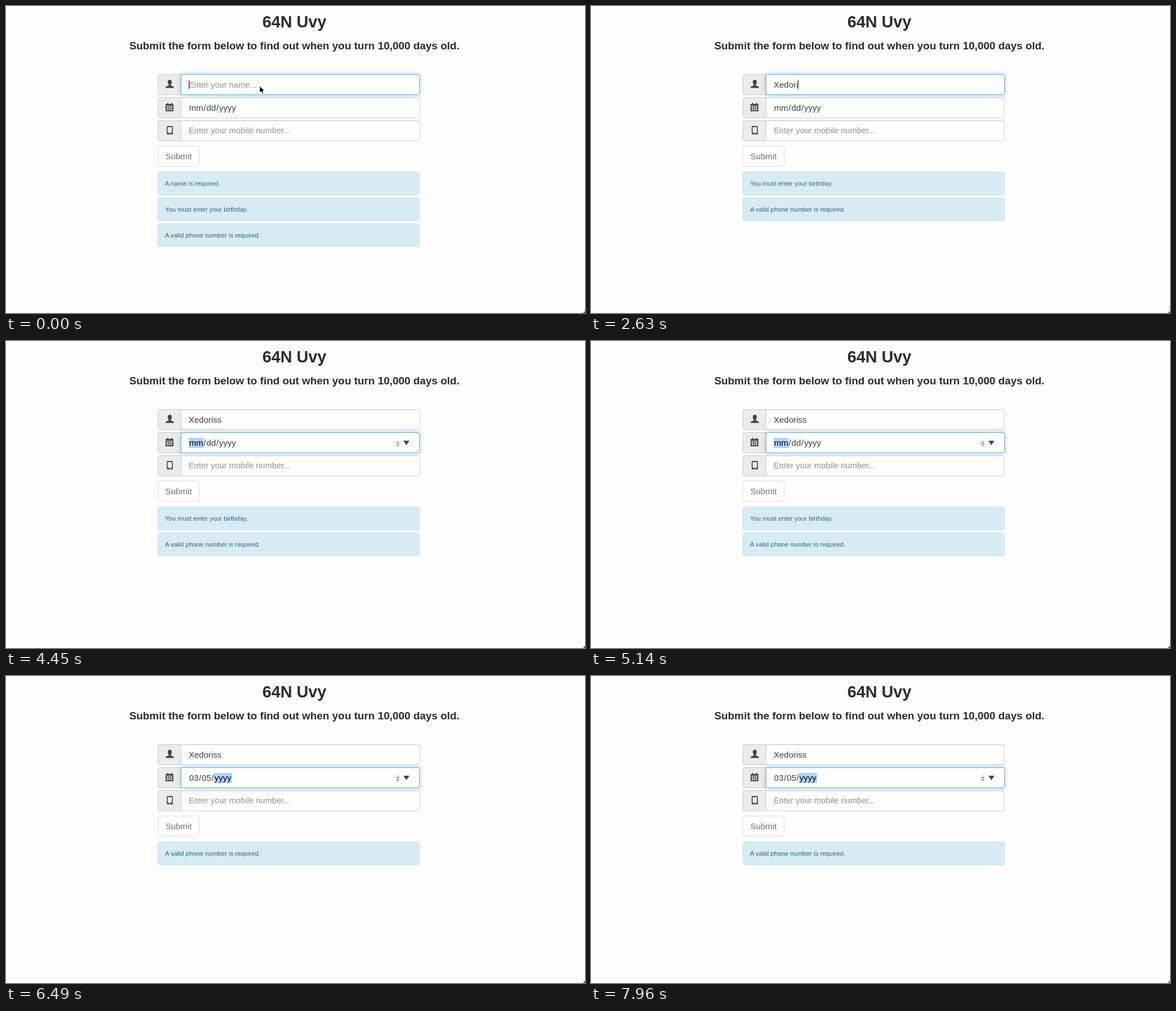
An HTML page that plays this animation: 1027 by 545 pixels, repeating every 8 s.

```html
<!DOCTYPE html>
<html lang="en">
<head>
<meta charset="utf-8">
<title>Day counter form</title>
<style>
* { box-sizing: border-box; }
html, body { margin: 0; width: 100%; height: 100%; overflow: hidden; background: #fdfdfc; }
body { position: relative; font: 15px "Liberation Sans", Arial, sans-serif; color: #404040; }
body > *, .row > * { position: absolute; }
h1, h2 { margin: 0; left: 0; width: 1023px; text-align: center; color: #2c2c2c; white-space: nowrap; }
h1 { top: 8px; font-size: 28.8px; line-height: 40px; }
h2 { top: 58px; font-size: 18.9px; line-height: 25px; }
.row { left: 269px; width: 465px; height: 37px; }
.addon { inset: 0 auto 0 0; width: 42px; background: #ebebeb; border: 1px solid #ccc; border-radius: 4px 0 0 4px; }
.addon svg { position: absolute; left: 13px; top: 9px; fill: #444; }
.field, .focus { inset: 0 0 0 41px; border: 1px solid #ccc; border-radius: 0 4px 4px 0; }
.field { background: #fdfdfc; padding-left: 13px; line-height: 35px; white-space: nowrap;
  box-shadow: inset 0 1px 1px rgba(0,0,0,.06); }
.focus { border-color: #66afe9; box-shadow: 0 0 8px rgba(102,175,233,.6); }
.hint { color: #919191; font-size: 14.7px; }
.caret { display: inline-block; width: 1px; height: 17px; margin-right: -1px; vertical-align: -3px; background: #333; }
.part { display: inline-block; padding: 0 .8px; line-height: 18px; }
.part.on { background: #b0d5fd; color: #000; }
#picker { left: 420px; top: 12px; }
button { left: 269px; top: 248px; width: 74px; height: 37px; padding: 0; font: inherit; color: #707070;
  background: #fefefe; border: 1px solid #dcdcdc; border-radius: 4px; }
.alert { left: 269px; width: 465px; height: 42px; padding-left: 12px; font-size: 11.35px; line-height: 41px;
  color: #2f6480; background: #d7ebf3; border: 1px solid #c5e6ef; border-radius: 4px; }
#mouse { left: 449px; top: 141px; }
#corner { right: 0; bottom: 0; width: 4px; height: 4px; background: radial-gradient(circle at 0 0, transparent 3px, #222 4px); }
</style>
</head>
<body>
<h1>64N Uvy</h1>
<h2>Submit the form below to find out when you turn 10,000 days old.</h2>

<div class="row" style="top:121px">
  <div class="addon"><svg width="16" height="16"><path d="M7.5 0C10.3 0 11.3 2 11 4.8 10.8 6.8 10 8 9.4 8.8V10L14 12Q15 12.6 15 14.5H0Q0 12.6 1 12L5.6 10V8.8C5 8 4.2 6.8 4 4.8 3.7 2 4.7 0 7.5 0Z"/></svg></div>
  <div class="field" id="name"></div><div class="focus"></div>
</div>
<div class="row" style="top:162px">
  <div class="addon"><svg width="16" height="16"><path d="M0 2H14V15H0ZM3 0H5V3H3ZM9.5 0H11.5V3H9.5Z"/><path d="M1 5.5H13M1 8.5H13M1 11.5H13M3.5 6V14M7 6V14M10.5 6V14" stroke="#ebebeb" stroke-width=".9"/></svg></div>
  <div class="field" id="date"></div><div class="focus"></div>
  <svg id="picker" width="30" height="16" fill="#444"><rect x="2.5" y="2.5" width="7" height="11" rx="3.5" fill="#fff" stroke="#ccc"/><path d="M4 7L6 4.5 8 7ZM4 9.5L6 12 8 9.5ZM16 3H26.5L21.2 11Z"/></svg>
</div>
<div class="row" style="top:203px">
  <div class="addon"><svg width="16" height="16"><path fill-rule="evenodd" d="M4 0H11Q13 0 13 2V13Q13 15 11 15H4Q2 15 2 13V2Q2 0 4 0ZM3.6 2V12H11.4V2ZM6.2 12.8V14H8.8V12.8Z"/></svg></div>
  <div class="field hint">Enter your mobile number...</div>
</div>

<button type="button">Submit</button>
<div class="alert">A name is required.</div>
<div class="alert">You must enter your birthday.</div>
<div class="alert">A valid phone number is required.</div>
<svg id="mouse" width="12" height="18"><path d="M1 1V13.2L3.8 10.6 5.8 15.2 7.8 14.3 5.9 9.9H9.6Z" fill="#000" stroke="#fff" stroke-width=".8"/></svg>
<div id="corner"></div>

<script>
const LOOP = 8000, BLINK = 520, FADE = 150;
const NAME = 'Xedoriss';
const KEYS = [1380, 1640, 1900, 2130, 2390, 2580, 2760, 2960];
const MOUSE_OFF = 1230, TAB = 3600, MONTH = 5300, DAY = 6300;

const get = id => document.getElementById(id);
const glows = document.querySelectorAll('.focus');
const alerts = document.querySelectorAll('.alert');
const show = (el, on) => el.style.visibility = on ? 'visible' : 'hidden';
const setHtml = (el, html) => { if (el.last !== html) el.innerHTML = el.last = html; };

function nameHtml(t) {
  const typed = KEYS.filter(k => k <= t).length;
  const lastKey = typed ? KEYS[typed - 1] : BLINK - 1020;
  const lit = t < TAB && (t - lastKey) % (2 * BLINK) < BLINK;
  const caret = lit ? '<i class="caret"></i>' : '';
  return typed ? NAME.slice(0, typed) + caret : caret + '<span class="hint">Enter your name...</span>';
}

function dateHtml(t) {
  const active = t < TAB ? -1 : t < MONTH ? 0 : t < DAY ? 1 : 2;
  return [t < MONTH ? 'mm' : '03', t < DAY ? 'dd' : '05', 'yyyy']
    .map((s, i) => `<span class="part${i === active ? ' on' : ''}">${s}</span>`).join('/');
}

function render(t) {
  setHtml(get('name'), nameHtml(t));
  setHtml(get('date'), dateHtml(t));

  const p = Math.min(1, Math.max(0, (t - TAB) / FADE));
  const ease = p * p * (3 - 2 * p);
  glows[0].style.opacity = 1 - ease;
  glows[1].style.opacity = ease;
  show(get('picker'), t >= TAB);
  show(get('mouse'), t < MOUSE_OFF);

  let top = 293.5;
  [t < KEYS[0], t < MONTH, true].forEach((on, i) => {
    show(alerts[i], on);
    alerts[i].style.top = top + 'px';
    if (on) top += 46;
  });
}

function frame(now) {
  render(now % LOOP);
  requestAnimationFrame(frame);
}
render(0);
requestAnimationFrame(frame);
</script>
</body>
</html>
```
